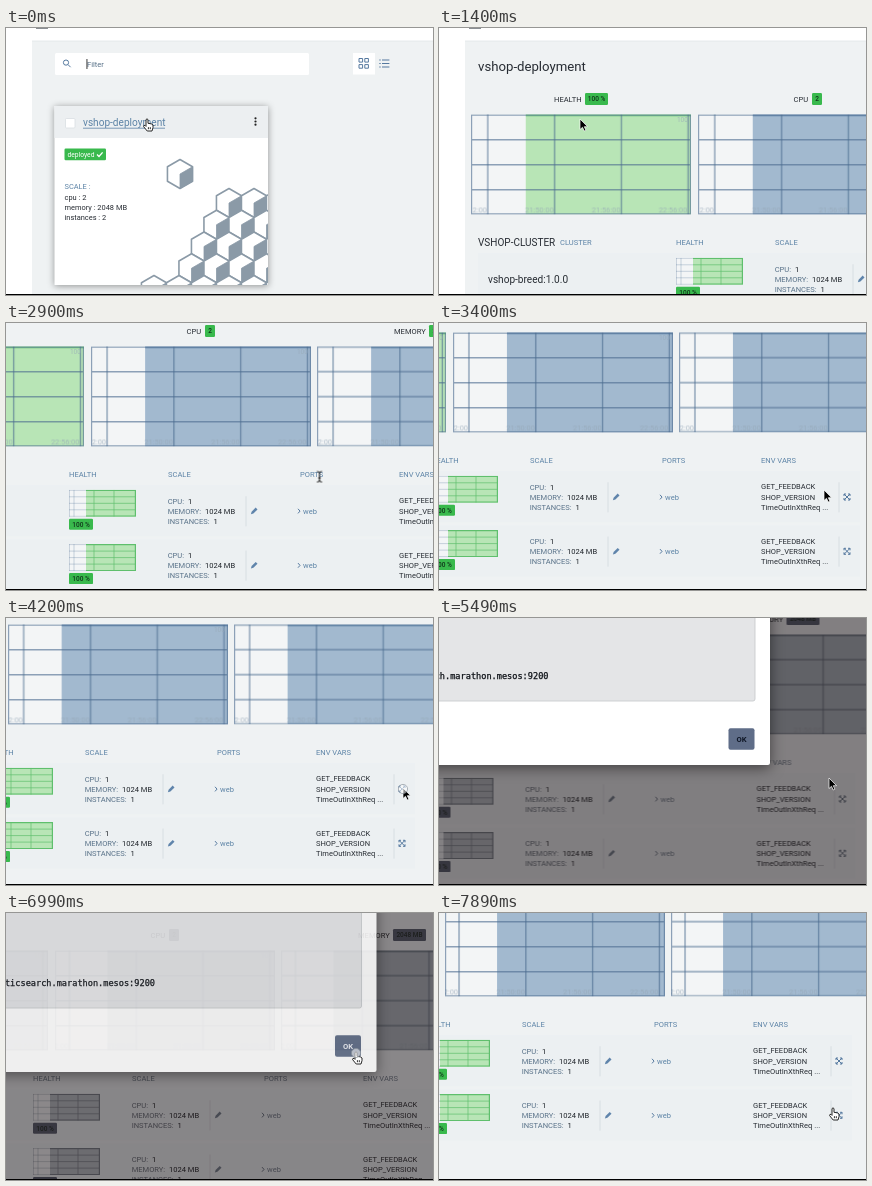
Animation of 427 by 267 pixels, one loop 7990 ms. Source, as an HTML page:

```html
<!DOCTYPE html>
<html lang="en">
<head>
<meta charset="utf-8">
<title>Deployment walkthrough</title>
<style>
html, body { margin: 0; width: 100%; height: 100%; overflow: hidden; background: #eff2f3; }
svg { display: block; }
#stage { width: 100vw; height: 100vh; }
text { font-family: Roboto, "Open Sans", sans-serif; font-size: 7.55px; fill: #272c33; white-space: pre; }
.blue { fill: #5c83a6; }
.key { fill: #587188; }
.white { fill: #fff; }
.bold { font-weight: 700; }
.mono { font-family: "DejaVu Sans Mono", "Noto Sans Mono", monospace; fill: #0c1016; stroke: #0c1016; stroke-width: .25; }
.tick { fill: #97a9b8; opacity: .7; }
.badge text { font-weight: 500; fill: #10331a; }
.badge rect { fill: #39b94d; }
.area.ok { fill: #b8e5b6; }
.area.load { fill: #a2b9cf; }
.grid { fill: none; stroke: #4c6c90; stroke-opacity: .62; stroke-width: 1.4; }
.thin { stroke-width: .7; stroke-opacity: .4; }
.top { fill: none; stroke-width: 1.2; }
.top.ok { stroke: #5fbf6d; }
.top.load { stroke: #5f83a8; }
.mesh { stroke-width: .7; }
.icon { fill: none; stroke: #55799f; stroke-width: 1; }

.cam, #pointer, #page, #list, #detail, #modal, #dim, #caret, #late, .ring, .shape, .badge rect, .area.ok, .top.ok, #ok, .drift {
  animation: 7.99s step-end infinite;
}
.cam { animation-name: cam; }
#pointer { animation-name: pointer; }
#page { animation-name: fade; }
#list { animation-name: leave; }
#detail { animation-name: enter; }
#late { animation-name: late; }
#modal { animation-name: modal; filter: drop-shadow(0 3px 7px rgba(0,0,0,.5)); }
#dim { animation-name: dim; }
#caret { animation-name: caret; }
#ok { animation-name: ok; }
#arrow { animation-name: arrow; }
#hand { animation-name: hand; }
#beam { animation-name: beam; }
.ring { animation-name: ring; }
.badge rect { animation-name: slateBadge; }
.area.ok { animation-name: slateArea; }
.top.ok { animation-name: slateLine; }
.drift { animation-name: drift; animation-timing-function: linear; }

@keyframes cam {
  0% { transform: translate(26px, 40px); }
  18.77% { transform: translate(26px, 40px); animation-timing-function: steps(8); }
  28.78% { transform: translate(0, 0); animation-timing-function: steps(6); }
  36.29% { transform: translate(-148px, -23px); animation-timing-function: steps(4); }
  41.3% { transform: translate(-215px, -36px); animation-timing-function: steps(4); }
  46.3% { transform: translate(-231px, -40px); }
  68.71% { transform: translate(-223.5px, -30px); animation-timing-function: steps(7); }
  77.47% { transform: translate(-184px, -9px); }
  92.49% { transform: translate(-184px, -9px); animation-timing-function: steps(5); }
  98.74%, 100% { transform: translate(-227px, -63px); }
}
@keyframes pointer {
  0% { transform: translate(141px, 91px); }
  18.77% { transform: translate(141px, 91px); animation-timing-function: steps(8); }
  28.78% { transform: translate(166.5px, 130px); animation-timing-function: steps(6); }
  36.29% { transform: translate(313.5px, 153.5px); animation-timing-function: steps(4); }
  41.3% { transform: translate(381px, 166px); animation-timing-function: steps(4); }
  46.3% { transform: translate(397px, 170px); }
  68.71% { transform: translate(390px, 160px); animation-timing-function: steps(7); }
  77.47% { transform: translate(350px, 139px); }
  92.49% { transform: translate(350px, 139px); animation-timing-function: steps(5); }
  98.74%, 100% { transform: translate(394px, 195px); }
}
@keyframes leave {
  0% { opacity: 1; }
  8.76% { opacity: .8; animation-timing-function: steps(2); }
  11.26%, 100% { opacity: 0; }
}
@keyframes enter {
  0% { opacity: 0; }
  10.01% { opacity: 0; animation-timing-function: steps(4); }
  15.01%, 100% { opacity: 1; }
}
@keyframes late { 0% { opacity: 0; } 17.52%, 100% { opacity: 1; } }
@keyframes modal {
  0% { opacity: 0; transform: translateY(-60px); }
  52.56% { opacity: 0; transform: translateY(-60px); animation-timing-function: steps(5); }
  58.69% { opacity: 1; transform: none; }
  83.73% { opacity: 1; transform: translateY(0); animation-timing-function: steps(3); }
  87.48% { opacity: .87; transform: translateY(-9px); animation-timing-function: steps(4); }
  92.49%, 100% { opacity: 0; transform: translateY(-60px); }
}
@keyframes dim {
  0% { opacity: 0; }
  52.56% { opacity: 0; animation-timing-function: steps(5); }
  58.69% { opacity: .5; }
  83.73% { opacity: .5; animation-timing-function: steps(3); }
  87.48% { opacity: .47; animation-timing-function: steps(4); }
  92.49%, 100% { opacity: 0; }
}
@keyframes fade {
  0% { filter: saturate(1); }
  52.56% { filter: saturate(1); animation-timing-function: steps(5); }
  58.69% { filter: saturate(.3); }
  87.48% { filter: saturate(.3); animation-timing-function: steps(4); }
  92.49%, 100% { filter: saturate(1); }
}
@keyframes slateBadge {
  52.56% { fill: #39b94d; animation-timing-function: steps(5); }
  58.69% { fill: #4c5f8c; }
  87.48% { fill: #4c5f8c; animation-timing-function: steps(4); }
  92.49% { fill: #39b94d; }
}
@keyframes slateArea {
  52.56% { fill: #b8e5b6; animation-timing-function: steps(5); }
  58.69% { fill: #b3c1cd; }
  87.48% { fill: #b3c1cd; animation-timing-function: steps(4); }
  92.49% { fill: #b8e5b6; }
}
@keyframes slateLine {
  52.56% { stroke: #5fbf6d; animation-timing-function: steps(5); }
  58.69% { stroke: #6c8199; }
  87.48% { stroke: #6c8199; animation-timing-function: steps(4); }
  92.49% { stroke: #5fbf6d; }
}
@keyframes caret { 0% { opacity: 1; } 3.75%, 100% { opacity: 0; } }
@keyframes ok { 0% { fill: #101828; } 78.72%, 100% { fill: #f2f4f8; } }
@keyframes ring {
  0% { opacity: 0; }
  6.25% { opacity: .85; }
  10.01% { opacity: 0; }
  48.81% { opacity: .85; }
  53.81% { opacity: 0; }
  83.73% { opacity: .85; }
  88.73%, 100% { opacity: 0; }
}
@keyframes arrow {
  0% { opacity: 0; }
  10.01% { opacity: 1; }
  35.04% { opacity: 0; }
  38.79% { opacity: 1; }
  76.22% { opacity: 0; }
  92.49% { opacity: 1; }
  97.49%, 100% { opacity: 0; }
}
@keyframes hand {
  0% { opacity: 1; }
  10.01% { opacity: 0; }
  76.22% { opacity: 1; }
  92.49% { opacity: 0; }
  97.49%, 100% { opacity: 1; }
}
@keyframes beam { 0% { opacity: 0; } 35.04% { opacity: 1; } 38.79%, 100% { opacity: 0; } }
@keyframes drift { from { transform: translateX(.3px); } to { transform: translateX(-3px); } }
</style>
</head>
<body>
<svg id="stage" viewBox="0 0 427 267">
  <g id="page">
    <rect width="427" height="267" fill="#eff2f3"/>
    <g class="cam">
      <path d="M-26-40H660V-27H0V340H-26Z" fill="#fff"/>
      <path d="M0-27H660" stroke="#e1e6e8" stroke-width=".8"/>
      <rect x="4" y="-41" width="12" height="2" fill="#8a8f94"/>
      <g id="detail"></g>
    </g>
    <g id="list"></g>
  </g>
  <rect id="dim" width="427" height="267" fill="#140e12"/>
  <g class="cam"><g id="modal"></g></g>
  <g id="pointer">
    <path id="arrow" class="shape" d="M0 0V10.5L2.5 8.3 4.2 12 5.9 11.2 4.3 7.7H7.6Z" fill="#000" stroke="#fff" stroke-width=".7"/>
    <path id="hand" class="shape" d="M-1 .6Q0-1 1 .6V4.3L3 4.6 4.6 5 6 6V8.6L5 12H.2L-3.4 7.6Q-3.4 5.9-2 6.4L-1 7.4ZM1.4 8.2V10.2M3.3 8.2V10.2" fill="#fff" stroke="#111" stroke-width=".9"/>
    <path id="beam" class="shape" d="M-2.5-5Q0-5 0-3.5Q0-5 2.5-5M0-3.5V4M-2.5 5.5Q0 5.5 0 4Q0 5.5 2.5 5.5M-1.2 1.5H1.2" fill="none" stroke="#111" stroke-width="1"/>
    <circle class="ring" cy="1" r="4.6" fill="#fff" fill-opacity=".65" stroke="#8b949c" stroke-width=".8"/>
  </g>
  <rect y="266" width="427" height="1" fill="#000"/>
</svg>
<script>
const byId = id => document.getElementById(id);

// y is the middle of the capitals
const text = (x, y, s, cls = '', size = 7.55, extra = '') =>
  `<text x="${x}" y="${y + size * 0.355}" class="${cls}" style="font-size:${size}px" ${extra}>${s}</text>`;

const badge = (x, y, w, h, s) =>
  `<g class="badge"><rect x="${x}" y="${y}" width="${w}" height="${h}" rx="1.2"/>` +
  text(x + w / 2, y + h / 2, s, '', 6.5, 'text-anchor="middle"') + '</g>';

const chart = (x, kind, peak, id = '') => {
  const times = ['2:00', '21:50:00', '21:56:00', '22:56:00'];
  const cols = times.map((_, i) => 17 + 66.8 * i);
  const ticks = cols.map((c, i) => text(c - 1, 95, times[i], 'tick', 7.4, 'text-anchor="end"')).join('');
  return `<svg x="${x}" y="46.5" width="220" height="100">
    <rect width="220" height="100" fill="#f3f5f6"/>
    <g ${id}><g class="drift">
      <rect class="area ${kind}" x="55" y="0" width="169" height="100"/>
      <path class="top ${kind}" d="M55 .8H224"/></g></g>
    <g class="drift"><path class="grid" d="${cols.map(c => `M${c} 0V100`).join('')}"/>${ticks}</g>
    <path class="grid" d="M0 .5H220M0 25.3H220M0 50.3H220M0 75.3H220M0 99.5H220M.5 0V100M219.5 0V100"/>
    ${text(217, 5, peak, 'tick', 6.6, 'text-anchor="end"')}
  </svg>`;
};

const spark = (x, y) => `<svg x="${x}" y="${y}" width="67" height="27">
  <rect width="67" height="27" fill="#f3f5f6"/>
  <rect class="area ok" x="17" width="50" height="27"/>
  <path class="grid thin" d="M0 .5H17M0 7H17M0 13.5H17M0 20H17M0 26.5H17M.4 0V27M5 0V27"/>
  <path class="top ok mesh" d="M17 7H67M17 13.5H67M17 20H67M25 0V27M45 0V27"/>
  <path class="top ok" d="M17 .6H67M17 26.4H67M66.4 0V27"/>
</svg>`;

const pair = (y, key, value) =>
  `<text x="309.7" y="${y + 2.7}" class="key">${key}:<tspan dx="3.8" fill="#1f242a">${value}</tspan></text>`;

const row = (y, name) => `
  <rect x="13" y="${y - 26}" width="627" height="51" fill="#ecf0f2"/>
  ${text(23, y, name, '', 10.1)}
  ${spark(211, y - 21.5)}
  ${badge(211, y + 7.5, 24, 11, '100 %')}
  ${pair(y - 10.5, 'CPU', 1)}${pair(y - .3, 'MEMORY', '1024 MB')}${pair(y + 9.7, 'INSTANCES', 1)}
  <path d="M388 ${y - 15}V${y + 15}M619 ${y - 15}V${y + 15}" stroke="#d3dadf" stroke-width=".8"/>
  <path transform="translate(396.3 ${y - .5})" d="M-3.4 3.4L-2.7.9 1.4-3.2 3.2-1.4-.9 2.7Z" fill="#5f84ab"/>
  <path class="icon" d="M440 ${y - 2.5}l2 2.3-2 2.3"/>
  ${text(445, y - .3, 'web', 'blue')}
  ${['GET_FEEDBACK', 'SHOP_VERSION', 'TimeOutInXthReq ...'].map((s, i) => text(541, y - 10.5 + 10.1 * i, s)).join('')}
  <path class="icon" transform="translate(627 ${y - .3})" d="M-3-3L3 3M3-3L-3 3M-3-1V-3H-1M1-3H3V-1M3 1V3H1M-1 3H-3V1"/>`;

byId('detail').innerHTML =
  text(13, -2, 'vshop-deployment', '', 13.2) +
  text(89, 31, 'HEALTH') + badge(120, 25, 23, 12, '100 %') +
  text(328.5, 31, 'CPU') + badge(347, 25, 10, 12, '2') +
  text(536, 31, 'MEMORY') + badge(571, 25, 33, 12, '2048 MB') +
  chart(6, 'ok', '100') + chart(233, 'load', '100', 'id="late"') + chart(459, 'load', '100') +
  text(13, 174, 'VSHOP-CLUSTER', '', 10) + text(95, 174.5, 'CLUSTER', 'blue') +
  [[211, 'HEALTH'], [310, 'SCALE'], [442, 'PORTS'], [541, 'ENV VARS']]
    .map(([x, s]) => text(x, 174, s, 'blue')).join('') +
  row(211.3, 'vshop-breed:1.0.0') + row(265.6, 'vshop-breed:1.1.0');

const cube = (x, y) => {
  const r = 14.5, w = r * Math.sqrt(3) / 2, h = r / 2;
  return `<g transform="translate(${x} ${y})" stroke="#8b9aa7" stroke-width="1.6" stroke-linejoin="round">
    <path d="M0${-r}L${w} ${-h}V${h}L0 ${r}L${-w} ${h}V${-h}Z" fill="#fff"/>
    <path d="M0 0L${w} ${-h}V${h}L0 ${r}Z" fill="#8b9aa7" stroke-width=".8"/></g>`;
};
const pile = [223, 210.5, 198, 185.5, 148].map((start, i) => {
  let out = '';
  for (let x = start; x < 276; x += 25) out += cube(x, 175 + 21.75 * i);
  return out;
}).join('');

byId('list').innerHTML = `
  <rect x="49" y="25" width="254" height="22" rx="1.5" fill="#fff"/>
  <circle class="icon" cx="60" cy="34.6" r="2.6"/><path class="icon" d="M62 36.6L64.6 39.2"/>
  ${text(81, 36.3, 'Filter', 'key')}
  <rect id="caret" x="80.5" y="31" width=".9" height="10" fill="#222"/>
  <rect x="347" y="25" width="22" height="21.5" fill="#fff"/>
  <path class="icon" d="M353 30.5h3.6v3.6h-3.6zM358.8 30.5h3.6v3.6h-3.6zM353 36.6h3.6v3.6h-3.6zM358.8 36.6h3.6v3.6h-3.6z"/>
  <path class="icon" d="M373.3 32h1.4M376 32H383.4M373.3 35.5h1.4M376 35.5H383.4M373.3 39h1.4M376 39H383.4"/>
  <rect x="48.5" y="78" width="213.5" height="179" fill="#fff" style="filter:drop-shadow(0 1px 3.5px rgba(0,0,0,.4))"/>
  <rect x="48.5" y="78" width="213.5" height="32" fill="#eceff1"/>
  <rect x="59.5" y="90.5" width="9.5" height="9.5" rx="1" fill="#fff" stroke="#d6dce0" stroke-width=".7"/>
  ${text(77, 94.5, 'vshop-deployment', 'blue', 10.1)}
  <path d="M77 100.2H159" stroke="#5c83a6" stroke-width=".8"/>
  ${[90.3, 93.5, 96.7].map(y => `<circle cx="249.5" cy="${y}" r="1.1" fill="#222"/>`).join('')}
  <rect x="58.5" y="120.5" width="41.5" height="11.8" rx="1.2" fill="#39b94d"/>
  ${text(61.5, 126.6, 'deployed', 'white', 6.7)}
  <path d="M91 126.5L93 128.5 96.6 124.4" fill="none" stroke="#fff" stroke-width="1.3"/>
  ${text(58.5, 158, 'SCALE :', 'blue', 7.45)}
  ${['cpu : 2', 'memory : 2048 MB', 'instances : 2'].map((s, i) => text(58.5, 169.8 + 9.9 * i, s, '', 7.45)).join('')}
  <svg x="48.5" y="78" width="213.5" height="179" viewBox="48.5 78 213.5 179">${cube(174, 146)}${pile}</svg>`;

byId('modal').innerHTML = `
  <rect x="-60" y="-240" width="614.5" height="417" rx="2" fill="#fff"/>
  <rect x="-40" y="-180" width="579.5" height="293" rx="2" fill="#e4e5e7" stroke="#c4c7ca" stroke-width=".8"/>
  ${text(333, 88, 'elasticsearch.marathon.mesos:9200', 'mono', 8.6, 'text-anchor="end"')}
  <rect x="513" y="140.3" width="26" height="21.4" rx="2" fill="#5f6d88"/>
  ${text(526, 151, 'OK', 'bold', 7.6, 'id="ok" text-anchor="middle"')}`;
</script>
</body>
</html>
```
